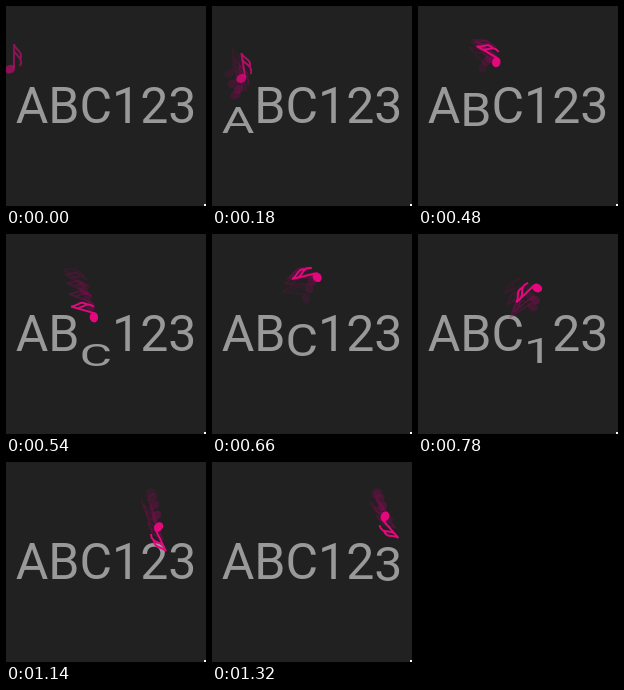
Animation of 200x200 px, one loop 1380 ms. Source, as an HTML page with a canvas:

```html
<!DOCTYPE html>
<html lang="en">
<head>
<meta charset="utf-8">
<title>Bouncing note</title>
<style>
  html, body { margin: 0; width: 100%; height: 100%; overflow: hidden; background: #212121; }
  canvas { display: block; width: 200px; height: 200px; }
</style>
</head>
<body>
<canvas id="stage" width="200" height="200"></canvas>
<script>
const ctx = document.getElementById('stage').getContext('2d');
const LOOP = 1380, STEP = 60;
const FIRST_HIT = 105, HIT_GAP = 208, RECOVERY = 200;
const FIRST_BOUNCE = 145, BOUNCE = 200;
const letters = [...'ABC123'];

// Each letter is knocked down at once, then eases back to rest.
function drawLetters(t) {
  ctx.font = '50px Roboto, sans-serif';
  ctx.fillStyle = '#999';
  let x = 9.75;
  letters.forEach((letter, i) => {
    const age = t - FIRST_HIT - i * HIT_GAP;
    const press = age < 0 ? 0 : Math.max(0, 1 - age / RECOVERY);
    ctx.save();
    ctx.translate(x, 117 + 16.5 * press);
    ctx.scale(1, 1 - 0.4 * press);
    ctx.fillText(letter, 0, 0);
    ctx.restore();
    x += ctx.measureText(letter).width;
  });
}

// The note drifts right, bounces and slowly turns backwards around its centre.
function drawNote(t, color, alpha) {
  const height = Math.abs(Math.sin(Math.PI * (t - FIRST_BOUNCE) / BOUNCE));
  ctx.save();
  ctx.translate(7 + 0.13 * t, 80 - 38 * height);
  ctx.rotate(-1.94 * (1 - Math.cos(Math.PI * t / LOOP)));
  ctx.globalAlpha = alpha;
  ctx.fillStyle = ctx.strokeStyle = color;
  ctx.beginPath();
  ctx.ellipse(-3, 12, 5.2, 4.2, -0.35, 0, 2 * Math.PI);
  ctx.fill();
  ctx.lineWidth = 2;
  ctx.beginPath();
  ctx.moveTo(1, 11);
  ctx.lineTo(1, -13);
  for (const y of [-13, -7]) {
    ctx.moveTo(1, y);
    ctx.bezierCurveTo(2, y + 6, 11, y + 7, 7, y + 16);
  }
  ctx.stroke();
  ctx.restore();
}

function frame(now) {
  const t = Math.floor(now % LOOP / STEP) * STEP;
  ctx.fillStyle = '#212121';
  ctx.fillRect(0, 0, 200, 200);
  ctx.fillStyle = '#fff';
  ctx.fillRect(198, 198, 2, 2);
  drawLetters(t);
  for (let k = 4; k > 0; k--) {
    const past = t - k * 20;
    if (past > 0) drawNote(past, '#8a0a55', 0.5 - k * 0.08);
  }
  drawNote(t, '#e5077e', Math.min(1, 0.55 + t / 900));
  requestAnimationFrame(frame);
}
requestAnimationFrame(frame);
</script>
</body>
</html>
```
